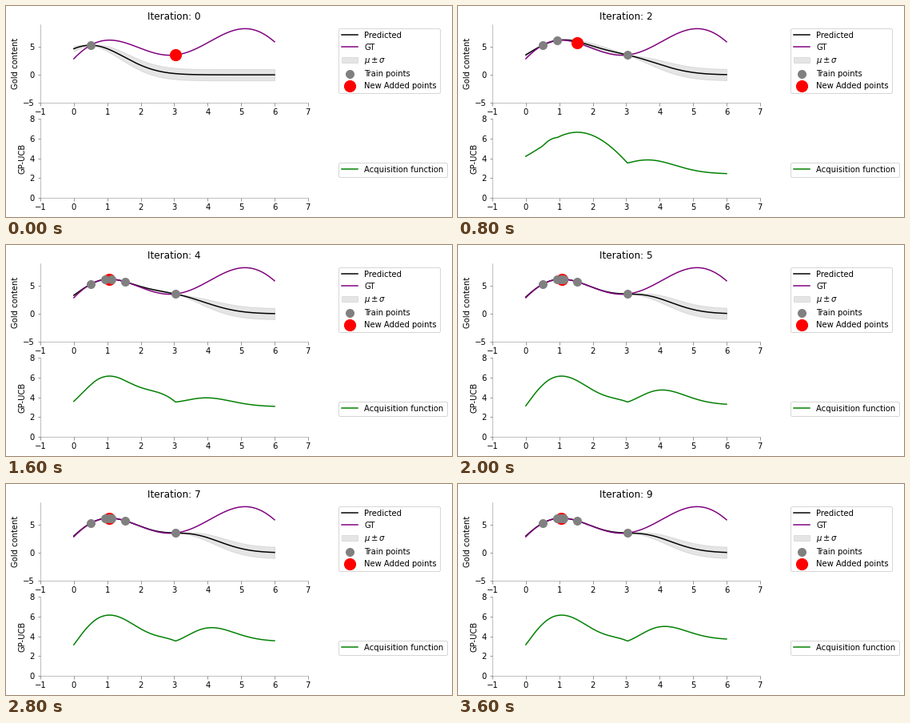
Write a matplotlib script that moves like this. It is 558 by 264 pixels and loops after 4 s.

```python
import numpy as np
import matplotlib.pyplot as plt
from matplotlib.animation import FuncAnimation

W, H, DPI = 558, 264, 72
FRAMES, STEP_MS = 10, 400
NOISE = 1e-10

plt.rcParams.update({"font.family": "DejaVu Sans", "font.size": 10})

grid = np.linspace(0, 6, 400)
# Sampling order: start point, then each newly queried point
samples = np.array([0.5, 3.04, 0.94, 1.53, 1.13, 1.055,
                    1.08, 1.055, 1.06, 1.055, 1.055])


def truth(x):
    return 2 * (x - 3) * np.sin(x - 3) + x / 2 + 2


def rbf(a, b):
    return np.exp(-0.5 * (a[:, None] - b[None, :]) ** 2)


def posterior(train):
    """Mean and standard deviation of a unit RBF Gaussian process."""
    K = rbf(train, train) + NOISE * np.eye(len(train))
    k = rbf(train, grid)
    mean = k.T @ np.linalg.solve(K, truth(train))
    var = 1 - np.sum(k * np.linalg.solve(K, k), axis=0)
    return mean, np.sqrt(np.clip(var, 0, None))


def ucb(mean, std, t):
    beta = 2 * np.log(t ** 2.5 * np.pi ** 2 / 3)
    return mean + np.sqrt(beta) * std


fig = plt.figure(figsize=(W / DPI, H / DPI), dpi=DPI, facecolor="white")


def add_panel(bottom):
    return fig.add_axes([43 / W, bottom / H, 334.8 / W, 98.84 / H])


top = add_panel(142.6)
low = add_panel(24.0)


def style(ax, ylim, yticks, ylabel, anchor_y):
    ax.set(xlim=(-1, 7), ylim=ylim, xticks=range(-1, 8),
           yticks=yticks, ylabel=ylabel)
    for side in ("top", "right"):
        ax.spines[side].set_visible(False)
    for side in ("left", "bottom"):
        ax.spines[side].set(color="gray", linewidth=0.5)
    ax.tick_params(direction="out", color="gray")
    ax.legend(loc="upper left", bbox_to_anchor=(1.1, anchor_y))


def draw(t):
    train, new = samples[:t + 1], samples[t + 1]
    mean, std = posterior(train)

    top.clear()
    top.plot(grid, mean, color="black", label="Predicted")
    top.plot(grid, truth(grid), color="purple", label="GT")
    top.fill_between(grid, mean - std, mean + std, color="gray",
                     alpha=0.2, label=r"$\mu \pm \sigma$")
    top.scatter(train, truth(train), s=100, color="gray",
                zorder=12, label="Train points")
    top.scatter([new], [truth(new)], s=200, color="red",
                zorder=10, label="New Added points")
    top.set_title(f"Iteration: {t}")
    style(top, (-5, 9), (-5, 0, 5), "Gold content", 1.0)

    low.clear()
    curve = (grid, ucb(mean, std, t)) if t else ([], [])
    low.plot(*curve, color="green", label="Acquisition function")
    style(low, (0, 8), range(0, 9, 2), "GP-UCB", 0.5)
    return []


anim = FuncAnimation(fig, draw, frames=FRAMES, interval=STEP_MS,
                     repeat=True, repeat_delay=0, blit=False)
plt.show()
```
